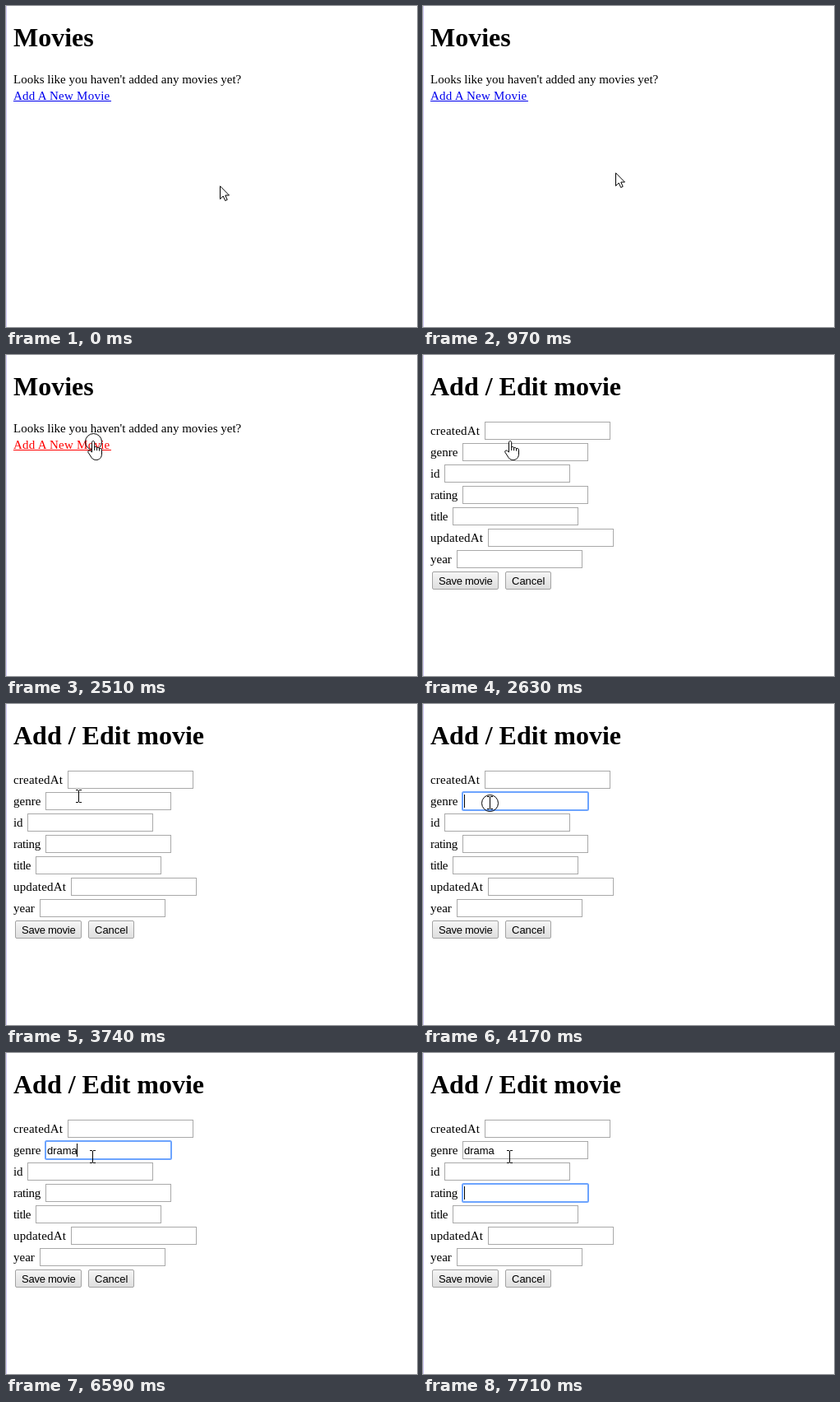
These frames come from a looping animation (500 by 390 pixels, 8 s). An HTML page:

```html
<!DOCTYPE html>
<html lang="en">
<head>
<meta charset="utf-8">
<title>Add a movie</title>
<style>
html, body { margin: 0; width: 100%; height: 100%; overflow: hidden; background: #fff; }
svg { display: block; }
text { white-space: pre; }
.serif { font: 15px "Liberation Serif", "Times New Roman", serif; }
.head { font: bold 32px "Liberation Serif", "Times New Roman", serif; }
.sans { font: 13px "Liberation Sans", Arial, sans-serif; }
.pointer { fill: #fff; stroke: #000; stroke-linejoin: round; }
</style>
</head>
<body>
<svg id="stage" width="500" height="390" viewBox="0 0 500 390">
  <defs>
    <linearGradient id="face" x2="0" y2="1">
      <stop offset="0" stop-color="#f6f6f6"/>
      <stop offset="1" stop-color="#dedede"/>
    </linearGradient>
  </defs>
  <rect width="500" height="390" fill="#fff"/>
  <rect width="1" height="390" fill="#cfc8f4"/>

  <g id="list">
    <text class="head" x="9" y="49">Movies</text>
    <text class="serif" x="9" y="94">Looks like you haven't added any movies yet?</text>
    <g id="link" fill="#0000ee">
      <text class="serif" x="9" y="114" letter-spacing=".25">Add A New Movie</text>
      <rect x="9" y="115" width="119" height="1"/>
    </g>
  </g>

  <g id="form">
    <text class="head" x="9" y="49">Add / Edit movie</text>
    <g id="fields"></g>
    <rect id="focus" width="153" height="22" rx="1.5" fill="none" stroke="#4d90fe" stroke-width="2" stroke-opacity=".82"/>
    <text id="typed" class="sans" x="50" y="123"></text>
    <rect id="caret" width="1" height="16"/>
    <g id="buttons"></g>
  </g>

  <circle id="ring" r="10" fill="none" stroke="#000"/>
  <g id="cursor">
    <path id="arrow" class="pointer" d="M.5 .8V16.6L4.2 13 6.7 18.5 9.2 17.4 6.8 12H11.5Z"/>
    <g id="hand" class="pointer">
      <path d="M5.5 14V2.2C5.5 0 8.7 0 8.7 2.2V8.2C9 7 11.6 7.2 11.6 9C12 7.8 14.4 8.2 14.5 10C15 9 17.5 9.4 17.5 11.3V16C17.5 20.5 14.8 23.5 10.5 23.5C7 23.5 5.4 21.5 4 19L.9 14.2C0 12.6 2 11.2 3.4 12.4Z"/>
      <path d="M8.7 8V12M11.6 9V12.2M14.5 10V12.5" fill="none"/>
    </g>
    <path id="beam" d="M0 .5H3M4 .5H7M3.5 1V15M0 15.5H3M4 15.5H7" fill="none" stroke="#000"/>
  </g>
</svg>
<script>
const $ = id => document.getElementById(id);
const LOOP = 8000;

function add(parent, tag, attrs, text) {
  const el = document.createElementNS("http://www.w3.org/2000/svg", tag);
  for (const k in attrs) el.setAttribute(k, attrs[k]);
  if (text) el.textContent = text;
  parent.appendChild(el);
  return el;
}

// label, left edge of its box, letter spacing
const fields = [
  ["createdAt", 75, .2], ["genre", 48, 0], ["id", 26, -.2], ["rating", 48, -.35],
  ["title", 36, -.45], ["updatedAt", 79, .17], ["year", 41, 0]
];
const rowTop = i => 81 + 26 * i;
const boxes = fields.map(([label, x, gap], i) => {
  add($("fields"), "text", { class: "serif", x: 9, y: rowTop(i) + 16, "letter-spacing": gap }, label);
  return add($("fields"), "rect", {
    x: x + .5, y: rowTop(i) + .5, width: 152, height: 21, fill: "#fff", stroke: "#a9a9a9"
  });
});

function button(label, x, width, gap) {
  add($("buttons"), "rect", {
    x: x + .5, y: 263.5, width: width - 1, height: 21, rx: 1.5, fill: "url(#face)", stroke: "#a3a3a3"
  });
  add($("buttons"), "text", { class: "sans", x: x + 8, y: 279, "letter-spacing": gap }, label);
}
button("Save movie", 11, 81, -.25);
button("Cancel", 100, 56, 0);

// start time, then values held until the next entry
const moves = [
  [0, "arrow", 260, 218], [970, "arrow", 234, 202], [1090, "arrow", 164, 152], [1210, "arrow", 114, 119],
  [1360, "hand", 99, 104],
  [3220, "beam", 105, 106], [3340, "beam", 108, 85], [3740, "beam", 85, 104], [3890, "beam", 78, 112],
  [4440, "beam", 97, 117], [4590, "beam", 102, 118]
];
const clicks = [[0], [540, 261.5, 219.5], [690], [2510, 106.5, 105.5], [2630], [4170, 81.5, 120.5], [4290]];
const focuses = [[0, -1], [4170, 1], [7000, 2], [7710, 3]];
const carets = [[0, 0], [4170, 1], [4710, 0], [5240, 1], [5800, 0], [6070, 1], [7430, 0], [7710, 1]];
const keys = [[0, ""], [6070, "d"], [6190, "dr"], [6310, "dra"], [6440, "dram"], [6590, "drama"]];

const at = (track, t) => track.filter(step => step[0] <= t).pop();
const show = (id, on) => $(id).style.display = on ? "" : "none";
function place(id, attrs) {
  for (const k in attrs) $(id).setAttribute(k, attrs[k]);
}

function draw(t) {
  const onForm = t >= 2630;
  show("list", !onForm);
  show("form", onForm);
  place("link", { fill: t >= 2510 ? "#ff0000" : "#0000ee" });

  const [, shape, x, y] = at(moves, t);
  for (const id of ["arrow", "hand", "beam"]) show(id, id === shape);
  place("cursor", { transform: `translate(${x} ${y})` });

  const [, cx, cy] = at(clicks, t);
  show("ring", cx);
  if (cx) place("ring", { cx, cy });

  const word = at(keys, t)[1];
  $("typed").textContent = word;

  const row = at(focuses, t)[1];
  boxes.forEach((box, i) => box.setAttribute("stroke", i === row ? "#fff" : "#a9a9a9"));
  show("focus", row >= 0);
  show("caret", at(carets, t)[1]);
  if (row >= 0) {
    const left = fields[row][1], top = rowTop(row);
    const typed = row === 1 && word ? Math.floor($("typed").getComputedTextLength()) : 0;
    place("focus", { x: left, y: top });
    place("caret", { x: left + 2 + typed, y: top + 3 });
  }
}

const start = performance.now();
function tick() {
  draw((performance.now() - start) % LOOP);
  requestAnimationFrame(tick);
}
tick();
</script>
</body>
</html>
```
